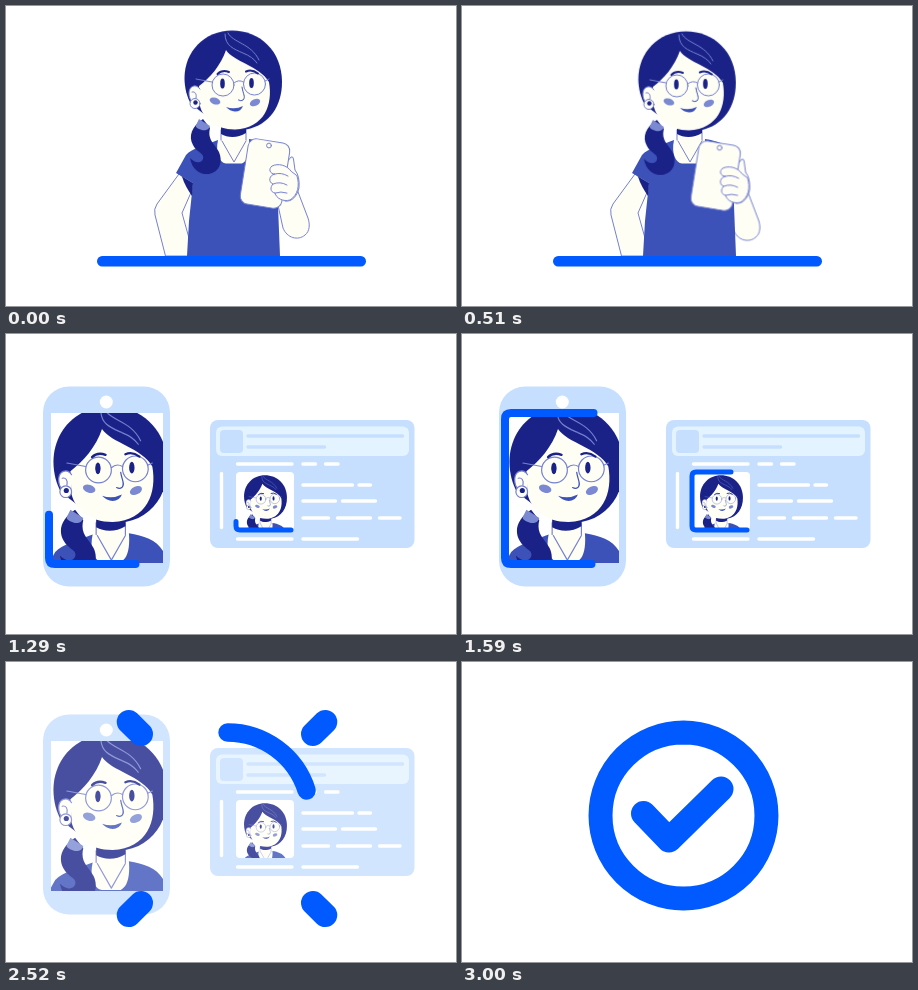
An HTML page that plays this animation: 450x300 px, repeating every 3600 ms.

```html
<!DOCTYPE html>
<html lang="en">
<head>
<meta charset="utf-8">
<title>Selfie and ID check</title>
<style>
  :root {
    --navy: #1a2288; --dress: #3c52b9; --line: #7480d0; --blush: #7a89d2;
    --skin: #fffef5; --pale: #c7dfff; --mist: #e3f3ff; --blue: #005aff;
  }
  html, body { margin: 0; width: 100%; height: 100%; overflow: hidden; background: #fff; }
  svg { display: block; width: 100%; height: 100%; }

  .navy { fill: var(--navy); }
  .dress { fill: var(--dress); }
  .skin { fill: var(--skin); }
  .blush { fill: var(--blush); }
  .pale { fill: var(--pale); }
  .mist { fill: var(--mist); }
  .ink { stroke: var(--line); stroke-width: 1; stroke-linecap: round; stroke-linejoin: round; }
  .thin { fill: none; }
  .mark { fill: none; stroke: var(--blue); stroke-linecap: round; stroke-linejoin: round; stroke-dasharray: 0 2; }
  .rows { fill: none; stroke: #fff; stroke-width: 3.4; stroke-linecap: round; }
  .rows.tint { stroke: var(--pale); }

  /* One shared 3.6 s clock */
  .portrait, .nod, .lift, .docs, .scan, .ray, .ring, .tick {
    animation: 3600ms linear infinite both;
  }
  .portrait { animation-name: portrait; }
  .nod { animation-name: nod; }
  .lift { animation-name: lift; }
  .docs { animation-name: docs; }
  .scan { animation-name: scan; }
  .ray { animation-name: ray; }
  .ring { animation-name: ring; }
  .tick { animation-name: tick; }

  @keyframes portrait { 0%, 15% { opacity: 1 } 25%, 100% { opacity: 0 } }
  @keyframes nod {
    0% { transform: translate(0, 0) }
    15%, 100% { transform: translate(-2.3px, .9px) }
  }
  @keyframes lift {
    0% { transform: translate(0, 0) }
    15%, 100% { transform: translate(-5.7px, 2.4px) }
  }
  @keyframes docs {
    0%, 15% { opacity: 0 }
    25%, 66.667% { opacity: 1 }
    83.333%, 100% { opacity: 0 }
  }
  @keyframes scan {
    0%, 29.16% { opacity: 0; stroke-dasharray: 0 2; stroke-dashoffset: 0 }
    29.167% { opacity: 1; stroke-dasharray: 0 2; stroke-dashoffset: 0; animation-timing-function: cubic-bezier(.37,0,.63,1) }
    44.167% { opacity: 1; stroke-dasharray: 1 2; stroke-dashoffset: 0; animation-timing-function: cubic-bezier(.37,0,.63,1) }
    59.15% { opacity: 1; stroke-dasharray: 0 2; stroke-dashoffset: -1 }
    59.16%, 100% { opacity: 0; stroke-dasharray: 0 2; stroke-dashoffset: -1 }
  }
  @keyframes ray {
    0%, 66.667% { opacity: 0; stroke-dasharray: 0 2; stroke-dashoffset: 0 }
    66.68% { opacity: 1; stroke-dasharray: 0 2; stroke-dashoffset: 0 }
    75% { opacity: 1; stroke-dasharray: 1 2; stroke-dashoffset: 0 }
    82.49% { opacity: 1; stroke-dasharray: 0 2; stroke-dashoffset: -1 }
    82.5%, 100% { opacity: 0; stroke-dasharray: 0 2; stroke-dashoffset: -1 }
  }
  @keyframes ring {
    0%, 66.667% { opacity: 0; stroke-dasharray: 0 2; stroke-width: 17 }
    66.68% { opacity: 1; stroke-dasharray: 0 2; stroke-width: 17 }
    83.333%, 100% { opacity: 1; stroke-dasharray: 1 2; stroke-width: 24 }
  }
  @keyframes tick {
    0%, 75% { opacity: 0; stroke-dasharray: 0 2 }
    75.01% { opacity: 1; stroke-dasharray: 0 2 }
    83.333%, 100% { opacity: 1; stroke-dasharray: 1 2 }
  }
</style>
</head>
<body>
<svg viewBox="0 0 450 300" xmlns="http://www.w3.org/2000/svg">
  <defs>
    <clipPath id="screen"><rect x="45" y="79" width="112" height="150"/></clipPath>
    <clipPath id="photo"><rect x="230" y="138" width="58" height="58" rx="4"/></clipPath>

    <g id="body">
      <path class="skin" d="M214 116H241V132L246 136 240 160H216L210 136 214 132Z"/>
      <path class="thin ink" d="M215 124V134M240 124V134"/>
      <path class="dress" d="M212 134C209 148 214 157 220 157.500H236C242 155 244 145 243 133C256 135 268 139 273 150L272 200 274 250H181L183 215 187 177 170 167 180 149C186 142 200 139 212 134Z"/>
      <path class="navy" d="M176 170.500L187 177 186 190C182 184 178 178 176 170.500Z"/>
      <path class="navy" d="M215 119H240V127C232 132 222 132 215 128Z"/>
      <path class="thin ink" d="M216 135L228 156 240 135"/>
    </g>

    <g id="head">
      <path class="navy" d="M197 113C186 120 182 130 187 139C191 147 199 147 197 153C195 158 189 157 184 152C186 164 195 169 203 168C214 166 217 155 213 146C209 138 201 134 204 122Z"/>
      <path class="blush" d="M193 113L204 120C203 124 199 125 196 124C192 123 189 121 190 119Z"/>
      <path class="navy" d="M226 24.500C198 24.500 178.500 46 178.500 72C178.500 82 181 91 185 98L198 108 240 123.500C264 119 276 99 276 76C276 45 254 24.500 226 24.500Z"/>
      <path class="skin" d="M193 80C204 72 215 59 220 44C228 56 254 60 263 76C267 98 259 122 229 123.500C209 123.500 197 112 194 100Z"/>
      <path class="skin ink" d="M194 83C190 77 183 80 183 87C183 94 187 99 194 98"/>
      <path class="thin ink" d="M186 86C189 85 191 88 190 92"/>
      <circle class="skin ink" cx="189" cy="97.500" r="5"/>
      <circle class="navy" cx="189.500" cy="96.500" r="2.200"/>
      <g class="thin ink">
        <path d="M219 28C219 40 228 43 237 47Q247 51 251 57M222 27C227 37 245 37 253 54"/>
        <circle cx="217" cy="79" r="11"/>
        <circle cx="248.500" cy="78" r="11"/>
        <path d="M228 77Q232.500 73 237.500 76M206 76L190 73M259 75L263 73"/>
      </g>
      <g class="navy">
        <ellipse cx="216.500" cy="77.500" rx="2.300" ry="5"/>
        <ellipse cx="245.500" cy="77" rx="2.300" ry="5"/>
      </g>
      <path d="M211.500 68Q216 63.500 223 66M240 65.500Q246 63 252 67.500" fill="none" stroke="#1a2288" stroke-width="2" stroke-linecap="round"/>
      <path d="M236 81C237 88 240 91 237 94Q235 95.500 232.500 94" fill="none" stroke="#3c52b9" stroke-linecap="round"/>
      <path class="dress" d="M220 101Q229 104 237 100Q235 105.500 229 105.500Q224 105 220 101Z"/>
      <g class="blush">
        <ellipse cx="209" cy="95" rx="5.500" ry="3.300" transform="rotate(18 209 95)"/>
        <ellipse cx="249" cy="96.500" rx="5.500" ry="3.400" transform="rotate(-25 249 96.500)"/>
      </g>
    </g>

    <g id="bust"><use href="#body"/><use href="#head"/></g>
  </defs>

  <g class="portrait">
    <path class="skin ink" d="M173 168L151 198Q147.500 203 149 209L159.500 250H188L176 207 187 182Z"/>
    <g class="lift">
      <path class="skin ink" d="M270 190L277 222C281 232 292 235 299 229C304 225 304 218 302 212L289 178Z"/>
    </g>
    <use href="#body"/>
    <use href="#head" class="nod"/>
    <g class="lift">
      <path class="skin ink" d="M281 156L285 151Q287 150 287.500 153L289 164Q294 170 293 182C291 190 286 196 279 195L270 188Z"/>
      <rect class="skin ink" x="238" y="134.500" width="42" height="66" rx="8" transform="rotate(9 259 167.500)"/>
      <circle class="skin ink" cx="263" cy="139.500" r="2.400"/>
      <path class="skin ink" d="M285 165C281 159 272 157 266 160C262 163 264 168 269 168C263 169 262 176 267 178C264 181 264 186 269 187C270 192 277 196 284 194C292 189 294 179 291 170Z"/>
      <path class="thin ink" d="M269 168Q275 166 282 170M267 178Q274 175 281 179M269 187Q275 185 281 187"/>
    </g>
    <rect x="91" y="250" width="269" height="10.500" rx="5.200" fill="#005aff"/>
  </g>

  <g class="docs">
    <rect class="pale" x="37" y="52.500" width="127" height="200" rx="26"/>
    <circle cx="100.300" cy="68" r="6.500" fill="#fff"/>
    <rect x="45" y="79" width="112" height="150" fill="#fff"/>
    <g clip-path="url(#screen)">
      <use href="#bust" transform="translate(-161.400 43.600) scale(1.170)"/>
    </g>

    <rect class="pale" x="204" y="86" width="204.500" height="128" rx="8"/>
    <rect class="mist" x="210" y="92.500" width="193" height="29.500" rx="6"/>
    <rect class="pale" x="214" y="96" width="23" height="23" rx="4"/>
    <path class="rows tint" d="M242 102H396.500M242 113H318.500"/>
    <path class="rows" d="M231.500 130H286M297 130H309.500M319.500 130H332
      M297 151H346.500M353 151H364.500M297 167H329.500M336.500 167H369.500
      M297 184H322.500M331.500 184H364.500M373.500 184H394
      M231.500 205H286M297 205H351.500M215.500 139.500V193.500"/>
    <rect x="230" y="138" width="58" height="58" rx="4" fill="#fff"/>
    <g clip-path="url(#photo)">
      <use href="#bust" transform="translate(159.500 130.500) scale(.44)"/>
    </g>
  </g>

  <path class="mark scan" pathLength="1" stroke-width="8" d="M129.500 230H49Q43 230 43 224V85Q43 79 49 79H131.500"/>
  <path class="mark scan" pathLength="1" stroke-width="5" d="M285 196H234Q230 196 230 192V142Q230 138 234 138H269"/>

  <g stroke-width="24">
    <path class="mark ray" pathLength="1" d="M135 72L104.500 42"/>
    <path class="mark ray" pathLength="1" d="M307 72L337.500 42"/>
    <path class="mark ray" pathLength="1" d="M307 241L337.500 271"/>
    <path class="mark ray" pathLength="1" d="M135 241L104.500 271"/>
  </g>
  <path class="mark ring" pathLength="1" d="M221.500 70.500A83 83 0 0 1 221.500 236.500A83 83 0 0 1 221.500 70.500"/>
  <path class="mark tick" pathLength="1" stroke-width="25" d="M181.500 151.500L207 178 259 127"/>
</svg>
</body>
</html>
```
